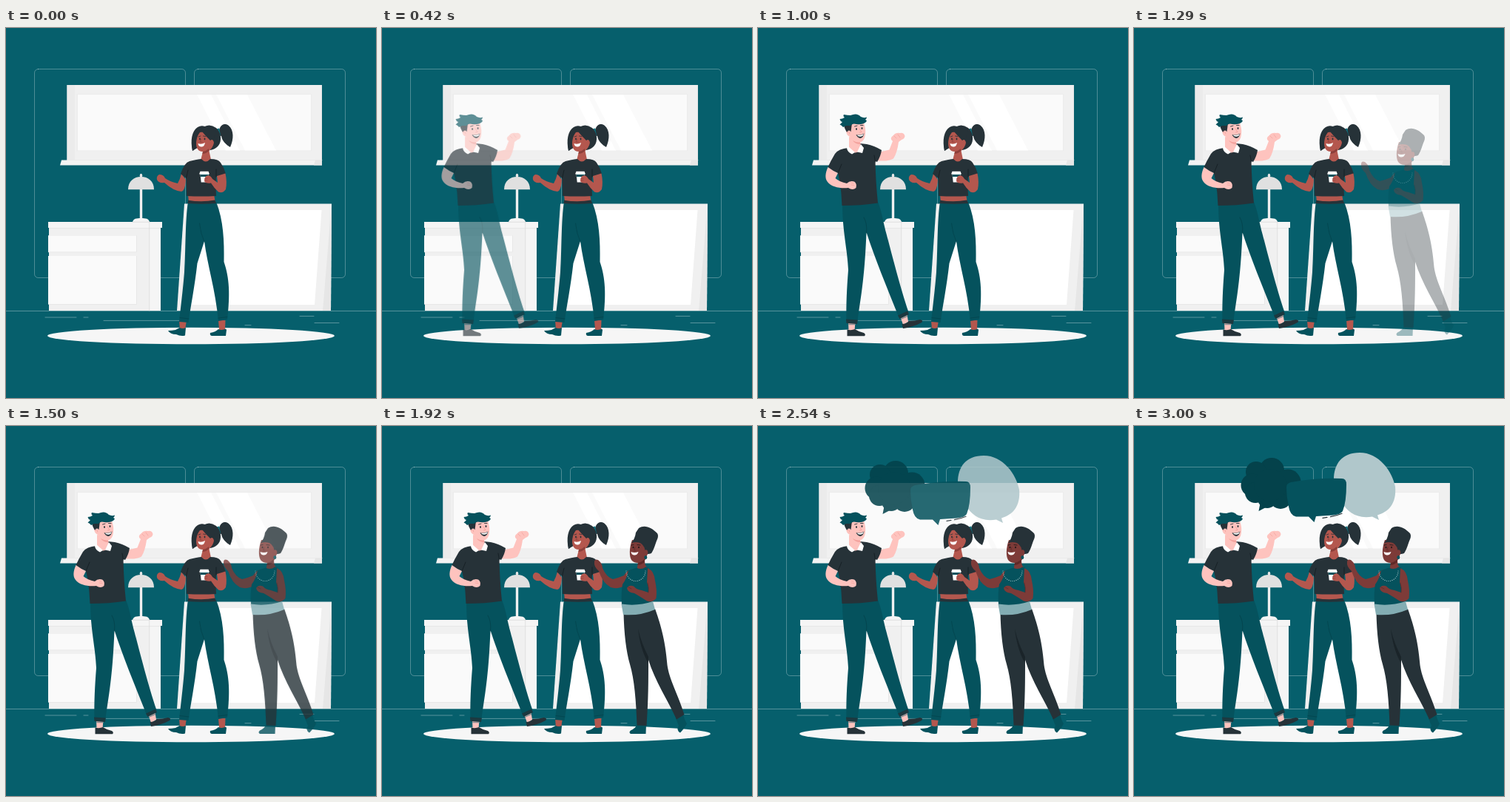
An HTML page with a canvas for the animation above (3.04 s loop, 500x500 px).

```html
<!DOCTYPE html>
<html lang="en">
<head>
<meta charset="utf-8">
<title>Friends talking</title>
<style>
html, body { margin: 0; width: 100%; height: 100%; overflow: hidden; background: #065f6c; }
canvas { display: block; width: 100%; height: 100%; }
</style>
</head>
<body>
<canvas id="stage"></canvas>
<script>
const SIZE = 500, LOOP = 3040, FPS = 24, LEAD = 30, SLIDE = 30;
const DPR = window.devicePixelRatio || 1;
const BG = '#065f6c', TEAL = '#05525d', DEEP = '#04424b', DARK = '#263238';
const PINK = '#fec3be', PINK2 = '#f3a29d', BROWN = '#b4574e', BROWN2 = '#7d3b38';

const setup = canvas => {
  canvas.width = canvas.height = SIZE * DPR;
  const c = canvas.getContext('2d');
  c.scale(DPR, DPR);
  c.lineCap = c.lineJoin = 'round';
  return c;
};

// A brush paints on one layer: filled paths, lines, circles.
function brush(c) {
  return {
    fill(color, d) { c.fillStyle = color; c.fill(new Path2D(d)); },
    line(color, width, d) { c.strokeStyle = color; c.lineWidth = width; c.stroke(new Path2D(d)); },
    rect(color, x, y, w, h) { c.fillStyle = color; c.fillRect(x, y, w, h); },
    oval(color, x, y, rx, ry = rx) {
      c.fillStyle = color;
      c.beginPath();
      c.ellipse(x, y, rx, ry, 0, 0, Math.PI * 2);
      c.fill();
    },
    round(color, x, y, w, h, r) {
      c.strokeStyle = color;
      c.lineWidth = 0.7;
      c.beginPath();
      c.roundRect(x, y, w, h, r);
      c.stroke();
    }
  };
}

function layer(paint) {
  const canvas = document.createElement('canvas');
  paint(brush(setup(canvas)));
  return canvas;
}

function room(b) {
  const thin = 'rgba(255,255,255,.42)';
  b.rect(BG, 0, 0, SIZE, SIZE);
  b.round(thin, 38.5, 55.5, 204, 282, 5);
  b.round(thin, 254.5, 55.5, 204, 282, 5);
  b.line(thin, 0.8, 'M0 382.4H500');
  b.line(thin, 0.8, 'M53 391H95M105 391H111M132 395.4H235M323 401.6H331M397 389.4H416M417 398.5H450');

  // window
  b.rect('#f0f0f0', 82.5, 77, 344.5, 105);
  b.rect('#ebebeb', 82.5, 77, 10.5, 101.5);
  b.rect('#e9e9e9', 425.5, 77, 1.5, 101.5);
  b.rect('#ececec', 95.5, 89, 317.5, 77.3);
  b.rect('#fafafa', 97, 90, 315, 75.5);
  b.fill('#fff', 'M258 90H277L316 165.5H297Z');
  b.fill('#fff', 'M284 90H326L365 165.5H323Z');
  b.fill('#f3f3f3', 'M75 178.5H427V185.5H73Z');
  b.fill('#e6e6e6', 'M418 178.5H427V185.5H416Z');
  b.line('#e6e6e6', 0.6, 'M82.5 178.5H427');

  // leaning board
  b.fill('#f0f0f0', 'M241 237.5H440L439 382H231Z');
  b.fill('#fff', 'M248 246H426.5L417 374H239Z');
  b.fill('#e6e6e6', 'M440 237.5L439 382H428Z');
  b.line('#e2e2e2', 0.6, 'M246 238L236.5 382');

  // cabinet
  b.rect('#f0f0f0', 58, 269, 151, 113);
  b.rect('#f5f5f5', 194, 269, 15, 113);
  b.rect('#e8e8e8', 58, 270, 151, 1.2);
  b.rect('#f5f5f5', 57, 262, 154, 8);
  b.line('#d8d8d8', 0.7, 'M193.7 262V382');
  for (const [y, h] of [[280.5, 22], [308, 65]]) {
    b.rect('#e4e4e4', 57, y, 119.7, h + 0.7);
    b.rect('#fafafa', 57, y, 119, h);
  }

  // lamp
  b.rect('#f0f0f0', 180.8, 216, 3.4, 43);
  b.oval('#e6e6e6', 182.5, 199.5, 1.8, 2.8);
  b.fill('#e0e0e0', 'M165 218.3C165 207 173 201 182.5 201S200 207 200 218.3Z');
  b.fill('#f5f5f5', 'M171 262.3C172 257.5 176 257 182.5 257S193 257.5 194 262.3Z');
  b.line('#d5d5d5', 0.7, 'M171 262.2H194');

  b.oval('#f6f6f6', 250, 416, 194, 11.3);
}

function host(b) {
  // feet and legs
  b.fill(BROWN, 'M234 395H244L242 408H235Z');
  b.fill(BROWN, 'M287 395H296.5L296 408H288Z');
  b.fill(TEAL, 'M219 409Q224 409 229 408L234.5 405Q239 407 243 405L242 415.5Q236 417 230 414Q222 414 219 409Z');
  b.fill(TEAL, 'M276 412Q283 411 287 407Q292 409 297 406.5L298 408L297 416H278Q275 415 276 412Z');
  b.fill(TEAL, 'M246 235C242 260 243 300 241 330C239 355 236 378 234 397L246.5 398C249 379 255 350 258.5 318L268 288C272 320 283 353 287 396L299 394C303 360 302 338 294.5 316C295 288 294 260 284 235Z');
  b.line(DEEP, 0.7, 'M261.5 264Q263 278 268 289');
  b.line(DEEP, 0.7, 'M235 391.5L247 393M287 392L299 390.5');
  b.fill(BROWN, 'M246 225H281L283 236H247Z');
  b.fill(DARK, 'M246 232.8Q265 236 282.5 232.5L284 237Q265 238.5 245.5 237Z');

  // head
  b.fill(DARK, 'M288 138C290 130 296 128 301 132C308 138 308 150 303 161C298 158 292 153 291 146L287 145Z');
  b.fill('#0a7380', 'M283 137L288 135.5L290 145L286 147Z');
  b.fill(DARK, 'M252 166C249 152 251 139 259 134Q264 131 268.5 133Q276 129 284 135C291 141 292 153 287 159Q283 164 276 165L262 160Z');
  b.fill(BROWN, 'M262 141C257 147 256 156 258 162Q260 167 266 167L263 179Q269 186 277 178L274.5 166Q280 161 281 155Q280 150 276 151Q276 144 270 140Z');
  b.fill('#8c3f3a', 'M266 167Q271 166 274 163L274.5 166Q270 170 265.5 170Z');
  b.fill(DARK, 'M269 134C261 136 257 145 257 154C256 160 256 164 252 166C250 150 252 140 260 135Z');
  b.fill(DARK, 'M264 139Q270 146 276 152L281 149L284 137L270 133Z');
  b.fill('#fff', 'M259.5 156Q264 158 269 155Q268 161 263.5 160.5Q260 160 259.5 156Z');
  b.oval(DARK, 262, 150, 0.9, 1.4);
  b.oval(DARK, 268.5, 150, 0.9, 1.4);
  b.line(DARK, 0.8, 'M260 147L263 146M266.5 146L270 146.5');
  b.line('#8c3f3a', 0.8, 'M264 150L262 154H265');

  // arms, shirt, cup
  b.fill(BROWN, 'M237 197Q235 205 232 210Q222 208 215 203Q213 198 207 198Q203 200 204 205Q206 210 214 209Q226 220 237 221Q242 220 243 205Z');
  b.fill(DARK, 'M257 178Q262 177 264 177Q270 184 276 177Q287 177 290 182Q295 189 297 197L284 201Q283 215 284 227Q264 228 244 227L243.5 203L236 197Q241 182 248 180Z');
  b.line('#111a1e', 0.7, 'M284 191V201M243.5 203L246 192');
  b.fill('#fff', 'M262.5 197H274L272.5 208.5H263.7Z');
  b.fill('#fff', 'M262.5 193.8H273.5L275 197.5H261Z');
  b.fill(TEAL, 'M262.7 198H273.7L273.2 201H263Z');
  b.fill(BROWN, 'M285 200L296.5 196.5Q299 208 297 218Q293 224 287 221.5Q281 216 277 209.5Q271 210.5 268.5 208Q267 203 271 199.5Q276 198 279 204L286 209Z');
  b.line('#8c3f3a', 0.6, 'M268.5 204L272 203.5M269 206.5L272 206');
}

function man(b) {
  // feet and legs
  b.fill(PINK, 'M122 397H131.5L130.5 409H122.5Z');
  b.fill(PINK, 'M192 389L201 384L203 397L196 401Z');
  b.line('#8b9194', 1.4, 'M122.5 400.5H131M193.5 393L201.5 389.5');
  b.fill(DARK, 'M120.5 407.5Q126 409 131 407Q137 411 143 412Q146 414 144 416.3H120.5Z');
  b.fill(DARK, 'M194.5 400Q201 400 204 396Q212 396 219 394Q224 395 221 398Q210 404 196 406Z');
  b.fill(TEAL, 'M114 238C114 275 121 300 122 327C120 352 119 374 119.5 395L134.5 396C138 368 144 342 146.5 276C157 309 174 350 190 390L203.5 384C192 350 181 306 174 280C169 262 167 247 162 235Z');
  b.line(DEEP, 0.8, 'M146.5 277Q148 264 143 256');
  b.fill('#1c3940', 'M119 393.5L134.8 394.5L134 400L119.5 399Z');
  b.fill('#1c3940', 'M189 388.5L202 382.5L204 387L191.5 393Z');

  // raised arm
  b.fill(PINK, 'M162 168Q171 166 177.5 164.5Q180 158 182 153Q177 149 183 145Q186 141 192 142Q197 141 198.5 146Q198 150 194 151L190 154Q188 169 183 176.5Q176 181 158 179Z');
  b.line(PINK2, 0.7, 'M184 146L187 149M189 144L192 148');

  // neck and shirt
  b.fill(DARK, 'M122 162Q109 163 104 170Q98 180 94.5 188Q101 193 108 196L110 205Q113 222 113.5 240Q139 240 162 236.5Q159 207 158.5 180L161 181Q166 173 167 165Q157 159 147 157L138 156Z');
  b.line('#10191d', 0.7, 'M108 196L113 184M158.5 181L157 172');
  b.fill(PINK, 'M123 147L138 152L139 163Q135 170 129 168L123 163Z');
  b.fill('#fff', 'M122 160L131 168L127 170.5Q121 168 120 162.5Z');
  b.fill('#fff', 'M139 157L143 162L141 169L134 167.5Z');

  // folded arm, in front of the shirt
  b.fill(PINK, 'M94.5 188C91 196 90 203 94 208C99 215 111 217 122 216Q128 220 132.5 216Q134 210 130 207.5Q124 206 120 210Q110 208 104.5 203L108 196Q101 193 94.5 188Z');
  b.line(PINK2, 0.8, 'M126 209L129 210M126 212L130 212.5');

  // head
  b.fill(PINK, 'M123 131C130 126 139 126 143 128Q146 137 145 144Q144 153 138 154.5Q129 155 124 147Q120 145 119 140Z');
  b.fill(PINK2, 'M128 152Q133 155 138 154.5L138.5 157Q131 157 128 152Z');
  b.fill(DARK, 'M115.5 130Q117 136 119.5 140Q123 142.5 125.5 140L127 129Z');
  b.oval(PINK, 123, 142, 2.6, 3.5);
  b.line(PINK2, 0.8, 'M121.5 140.5Q124.5 140 123.5 143');
  b.fill(TEAL, 'M115 134Q113 131 110.5 130.5Q113 128 114 127Q111 126 110.5 123Q114 123 117 121Q114.5 119 116 117Q121 118 125 118Q134 114 139 120Q143 122 147 120.5Q147 122 145 124Q148 125 146 127Q140 132 130 129.5Q126 130 125 132L119 132Z');
  b.oval(DARK, 133, 136.5, 0.9, 1.5);
  b.oval(DARK, 140.5, 135.5, 0.9, 1.5);
  b.line(DARK, 0.9, 'M130.5 133L134 132M138.5 131.5L142 131.5');
  b.line(PINK2, 0.9, 'M137 136L140 140.5L137.5 141');
  b.fill(DARK, 'M132.5 144Q138 145.5 143.5 142.5Q142 149 138 149Q134 148 132.5 144Z');
  b.fill('#fff', 'M133.5 144.5Q138 145.5 143 143.2Q142 146.5 138 146.8Q135 146.8 133.5 144.5Z');
}

function friend(b) {
  // feet and legs
  b.fill(TEAL, 'M346 403H358L357.5 416H337Q334 414 337 411.5Q343 409 346 403Z');
  b.fill(TEAL, 'M398 395L408 390Q410 398 413 402Q411 407 404 414.5Q398 411 402 405Z');
  b.fill(DARK, 'M327.5 252C328 280 331 305 336 322C342 342 344.5 372 345.5 404.5L358.5 405C361 370 361 345 361 316C370 345 387 370 399 396.5L409.5 390C400 360 389 342 386.5 323C384 288 376 264 370 247Z');
  b.fill('#1a2429', 'M347 274C349 292 353 306 360.5 320L361 312C355 300 350 288 347 274Z');

  // head and neck
  b.fill(BROWN2, 'M339 154C335 165 335 176 338 181Q341 185 347 185L345 196H361V192Q356 190 356 182Q362 175 359 157Z');
  b.fill('#5f2927', 'M347 185Q352 184 355.5 180V184Q351 188 346.5 188Z');
  b.fill(DARK, 'M348 138C356 133 365 137 373 145Q375 148 373 153C370 160 369 166 365 172Q360 174 356.5 172Q357 162 350 158Q344 156 338 158Q343 152 344 144Z');
  b.oval(BROWN2, 357.5, 171, 2.8, 3.8);
  b.oval(TEAL, 357.3, 177.5, 2, 2.6);
  b.fill('#fff', 'M337.5 170Q342 172 347.5 170Q346 175 341.5 174.5Q338 174 337.5 170Z');
  b.oval('#1d1718', 340.5, 164, 0.9, 1.3);
  b.oval('#1d1718', 348, 164, 0.9, 1.3);
  b.line('#1d1718', 0.8, 'M338 161L341 160.5M346 160.5L350 161');
  b.line('#5f2927', 0.8, 'M343 164L341.5 168H344');

  // arms and clothes
  b.fill(BROWN2, 'M288 184Q288 179 293 181Q299 186 299 192Q304 204 313 207Q321 205 328 202Q333 194 338 194L330 216Q318 221 310 218Q299 212 294 196Q287 190 288 184Z');
  b.fill(TEAL, 'M334 195L345 191.5Q351 195 357.5 190.5L361 191.5Q361 205 366 215L367 239Q346 245 325 241Q324 226 326 214Q332 206 334 195Z');
  b.fill('#83adb3', 'M324.5 240.5Q346 244 367 237L370 248Q349 257 327 255Z');
  for (let i = 0; i < 17; i++) {
    const a = Math.PI * i / 16;
    b.oval('#b5cfd2', 344 - 13 * Math.cos(a), 196 + 13.5 * Math.sin(a), 0.6);
  }
  b.fill(BROWN2, 'M360 192Q369 196 370 209Q373 222 371.5 233Q366 239 359 236.5Q349 230 342 226Q333 225 332 219Q335 214 341 216.5Q345 221 352 222L361 225Q362 219 359 211Z');
  b.line('#5f2927', 0.7, 'M334 218L338 220M360 212Q362 219 361 225');
}

function bubbles(b) {
  b.fill('#b0c7cb', 'M270 73C270 51 281 36 305 36C331 36 349 61 353 82C355 105 344 116 329 120.5L331 127L322 122.5C301 126 288 116 281 103C275 94 270 84 270 73Z');
  const puffs = [[186, 60, 17], [165, 62, 14], [160, 80, 15.5], [164, 90, 14], [180, 98, 13],
    [198, 97, 15], [208, 76, 17.5], [184, 80, 22]];
  for (const [x, y, r] of puffs) b.oval(DEEP, x, y, r);
  b.fill(DEEP, 'M171 102L168.5 115L180 109Z');
  b.fill(TEAL, 'M206 84Q205 78 212 76Q245 70 281 71Q287 71 287 79Q287 103 282 115Q279 119.5 269 120.5L246 122L243.5 130L236 122.5L219 122.5Q211 121 209 109Q206 96 206 84Z');
  b.line(DARK, 1.2, 'M255 124.3L261 123.4M265.5 122.6Q274 121.4 281 118.3');
}

// Cubic easing with a slight overshoot: bezier (.36, -.01, .5, 1.38).
function ease(p) {
  if (p <= 0) return 0;
  if (p >= 1) return 1;
  const at = (t, p1, p2) => 3 * (1 - t) * (1 - t) * t * p1 + 3 * (1 - t) * t * t * p2 + t * t * t;
  let lo = 0, hi = 1;
  for (let i = 0; i < 24; i++) {
    const mid = (lo + hi) / 2;
    if (at(mid, 0.36, 0.5) < p) lo = mid; else hi = mid;
  }
  return at(lo, -0.01, 1.38);
}

const view = setup(document.getElementById('stage'));
const back = layer(b => { room(b); host(b); });
const actors = [
  { art: layer(man), start: 0, dx: -SLIDE, dy: 0 },
  { art: layer(friend), start: 1000, dx: SLIDE, dy: 0 },
  { art: layer(bubbles), start: 2000, dx: 0, dy: SLIDE }
];

function draw(ms) {
  const step = Math.floor((ms % LOOP + 5) * FPS / 1000);
  const time = step * 1000 / FPS + LEAD;
  view.globalAlpha = 1;
  view.drawImage(back, 0, 0, SIZE, SIZE);
  for (const { art, start, dx, dy } of actors) {
    const k = ease((time - start) / 1000);
    if (k < 0.02) continue;
    view.globalAlpha = Math.min(k, 1);
    view.drawImage(art, dx * (1 - k), dy * (1 - k), SIZE, SIZE);
  }
}

const begin = performance.now();
function tick() {
  draw(performance.now() - begin);
  requestAnimationFrame(tick);
}
tick();
</script>
</body>
</html>
```
